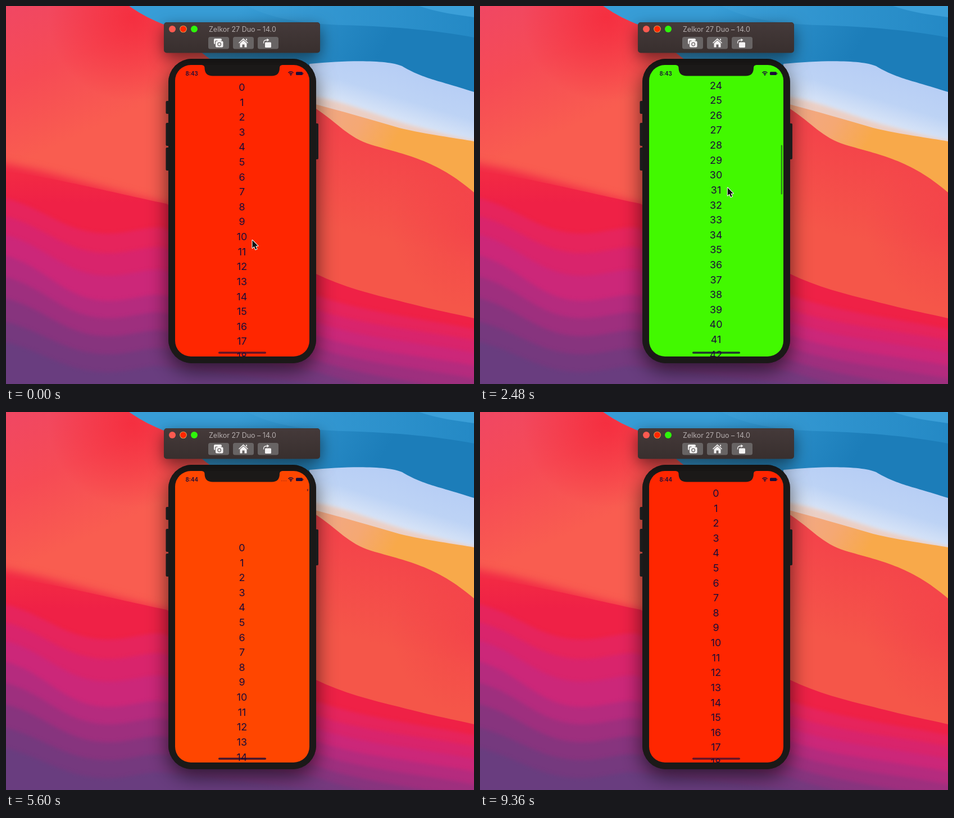
Write an HTML page with a canvas that moves like this. It is 833x673 px and loops after 9.44 s.

```html
<!DOCTYPE html>
<html lang="en">
<head>
<meta charset="utf-8">
<title>Scroll hue</title>
<style>
html, body { margin: 0; width: 100%; height: 100%; overflow: hidden; background: #000; }
canvas { display: block; width: 100vw; height: 100vh; }
</style>
</head>
<body>
<canvas id="stage" width="833" height="673"></canvas>
<script>
const W = 833, H = 673, LOOP = 9440, STEP = 80;
const ROW = 26.62, FIRST_Y = 144.5, MAX_SCROLL = 2191;
const ctx = document.getElementById('stage').getContext('2d');

// time, scroll offset, hue
const SCROLL = [
  [0, 0, 0], [960, 0, 0], [1680, 89, 12], [2040, 130, 20], [3040, 1378, 226],
  [3300, 1378, 226], [4080, 2191, 360], [4320, 2191, 360], [5280, 0, 0],
  [5600, -97, 14], [6000, 0, 0], [6400, 0, 0], [6880, 143, 14],
  [7280, 143, 14], [7920, 0, 0], [LOOP, 0, 0]
];
// time, x, y
const POINTER = [
  [0, 438, 417], [960, 438, 417], [1680, 442, 387], [3120, 439, 278],
  [4160, 416, 340], [4320, 416, 455], [4480, 417, 600]
];
const INDICATOR = [[960, 2960], [3300, 6000], [6400, 6960], [7280, 7920]];

function sample(keys, t) {
  let i = 1;
  while (i < keys.length - 1 && keys[i][0] < t) i++;
  const a = keys[i - 1], b = keys[i];
  const u = Math.min(1, Math.max(0, (t - a[0]) / (b[0] - a[0])));
  const s = u * u * (3 - 2 * u);
  return [a[1] + (b[1] - a[1]) * s, a[2] + (b[2] - a[2]) * s];
}

// Fully saturated hue as shown through the display's colour profile.
function hueColor(deg) {
  const channel = n => {
    const k = (n + deg / 60) % 6;
    return 1 - Math.max(0, Math.min(k, 4 - k, 1));
  };
  const lin = v => v <= 0.04045 ? v / 12.92 : ((v + 0.055) / 1.055) ** 2.4;
  const enc = v => v <= 0.0031308 ? v * 12.92 : 1.055 * v ** (1 / 2.4) - 0.055;
  const r = channel(5), g = channel(3), b = channel(1);
  const shown = enc(Math.min(1, 0.947 * lin(g) + 0.0194 * lin(r) + 0.033 * lin(b)));
  return `rgb(${[r, shown, b].map(v => Math.round(v * 255)).join()})`;
}

function box(c, x, y, w, h, r, fill) {
  c.beginPath();
  c.roundRect(x, y, w, h, r);
  c.fillStyle = fill;
  c.fill();
}

function dot(c, x, y, r, fill) {
  c.beginPath();
  c.arc(x, y, r, 0, Math.PI * 2);
  c.fillStyle = fill;
  c.fill();
}

function shape(c, d, fill) {
  c.fillStyle = fill;
  c.fill(new Path2D(d));
}

function gradient(c, x0, y0, x1, y1, ...colors) {
  const g = c.createLinearGradient(x0, y0, x1, y1);
  colors.forEach((color, i) => g.addColorStop(i / (colors.length - 1), color));
  return g;
}

function glow(c, x, y, r, rgb, alpha) {
  const g = c.createRadialGradient(x, y, 0, x, y, r);
  g.addColorStop(0, `rgba(${rgb},${alpha})`);
  g.addColorStop(1, `rgba(${rgb},0)`);
  c.fillStyle = g;
  c.fillRect(x - r, y - r, 2 * r, 2 * r);
}

function drawWallpaper(c) {
  // blue sky
  c.fillStyle = gradient(c, 420, 0, 640, 130, '#379dd7', '#1c7db9');
  c.fillRect(0, 0, W, H);
  shape(c, 'M210 0 H430 C470 22 530 32 600 34 C700 37 770 44 833 56 V0Z',
    gradient(c, 240, 0, 833, 0, '#45a9e0', '#3498d2', '#2489c5'));
  shape(c, 'M735 0 C770 12 800 15 833 20 V0Z', '#3b9fd8');

  // pale waves
  shape(c, 'M540 103 C610 96 680 96 705 107 C740 128 760 130 833 153 V260 H540Z',
    gradient(c, 700, 100, 665, 215, '#b6cdf5', '#bdd3f5', '#e6edf8'));
  c.filter = 'blur(3px)';
  shape(c, 'M540 160 C600 168 650 192 720 212 C765 224 800 233 840 241 V270 H540Z', '#ebcfc5');
  c.filter = 'none';
  shape(c, 'M540 172 C600 188 650 202 700 217 C750 229 800 235 833 241 V345 H540Z',
    gradient(c, 570, 180, 690, 245, '#f2a884', '#f5a873', '#f8a94a'));

  // coral hill
  c.save();
  c.beginPath();
  c.moveTo(0, 0);
  c.lineTo(219, 0);
  c.bezierCurveTo(245, 18, 262, 25, 283, 34);
  c.bezierCurveTo(340, 65, 352, 100, 400, 110);
  c.bezierCurveTo(480, 130, 530, 170, 552, 183);
  c.bezierCurveTo(590, 208, 610, 235, 650, 247);
  c.bezierCurveTo(710, 265, 765, 273, 833, 332);
  c.lineTo(W, H);
  c.lineTo(0, H);
  c.clip();
  c.fillStyle = gradient(c, 0, 0, 110, 240, '#f04763', '#f64b55', '#f95d50');
  c.fillRect(0, 0, 420, H);
  c.fillStyle = gradient(c, 640, 235, 600, 400, '#f4444a', '#f55649');
  c.fillRect(420, 0, 420, H);
  glow(c, 225, 20, 150, '245,40,58', 0.8);
  glow(c, 835, 390, 150, '243,62,74', 0.6);
  c.restore();

  // red slope and violet bands
  c.filter = 'blur(8px)';
  shape(c, 'M-20 278 C70 290 180 330 300 355 V420 H-20Z', '#f12945');
  c.filter = 'none';
  shape(c, 'M0 295 C70 302 190 332 285 352 L552 477 C600 500 650 513 700 525 C760 541 800 548 833 556 V673 H0Z',
    gradient(c, 0, 290, 0, 350, '#f32b43', '#ef2146'));
  const bands = [
    [340, 395, 515, 577, '#e6245c'], [372, 430, 540, 597, '#d9246c'],
    [405, 470, 563, 619, '#cc2779'], [442, 515, 586, 642, '#b52b7e'],
    [480, 546, 608, 665, '#9e2f7e'], [518, 578, 630, 690, '#87347e'],
    [560, 610, 650, 715, '#75397e'], [596, 642, 672, 740, '#693d7f']
  ];
  c.filter = 'blur(3px)';
  for (const [left, mid, start, end, color] of bands) {
    shape(c, `M-10 ${left} C70 ${left + 18} 100 ${mid + 8} 180 ${mid + 10}
      C220 ${mid + 11} 250 ${mid - 4} 280 ${mid} L552 ${start}
      C630 ${start + 28} 740 ${end - 20} 843 ${end} V783 H-10Z`, color);
  }
  c.filter = 'none';
}

function drawToolbar(c) {
  c.save();
  c.shadowColor = 'rgba(0,0,0,.55)';
  c.shadowBlur = 28;
  c.shadowOffsetY = 9;
  box(c, 281, 29, 278, 54.5, 5, '#3c3231');
  c.restore();
  box(c, 281.5, 29.5, 277, 53.5, 5, gradient(c, 0, 29, 0, 83, '#453a3a', '#382f2e'));
  dot(c, 296, 41, 6, '#fb5a50');
  dot(c, 315.5, 41, 6.3, '#dfa35c');
  dot(c, 315.5, 41, 5.4, '#ff2600');
  dot(c, 335, 41, 6, '#2ef50a');
  c.font = '12.5px Inter, sans-serif';
  c.fillStyle = '#b4adad';
  c.textAlign = 'left';
  c.fillText('Zelkor 27 Duo – 14.0', 361, 45.7);
  for (const x of [360, 404, 448]) box(c, x, 55, 37, 21.5, 3.5, '#686464');

  // camera
  const white = '#f5f3f3';
  box(c, 370, 58, 14, 10, 2, white);
  box(c, 372, 61.5, 15, 12.5, 2, '#686464');
  box(c, 373, 62.5, 13.5, 11, 2, white);
  box(c, 376.5, 60.8, 6, 3, 1, white);
  dot(c, 379.7, 68, 3.4, '#686464');
  dot(c, 379.7, 68, 2.2, white);
  // house
  shape(c, 'M422.5 57.5 L431 65.5 L430 66.6 L422.5 59.8 L415 66.6 L414 65.5Z', white);
  shape(c, 'M422.5 61 L428.5 66.4 V73.5 H424.5 V68.5 H420.5 V73.5 H416.5 V66.4Z M427 58.5 H429 V62 L427 60Z', white);
  // rotate
  box(c, 461, 64.5, 11, 9.5, 1.5, white);
  c.strokeStyle = white;
  c.lineWidth = 1.4;
  c.stroke(new Path2D('M458.5 66.5 C458 62 460.5 60.5 465 60.5'));
  shape(c, 'M464.5 57.7 L468.5 60.5 L464.5 63.3Z', white);
}

function drawPhone(c) {
  c.save();
  c.shadowColor = 'rgba(0,0,0,.62)';
  c.shadowBlur = 36;
  c.shadowOffsetY = 13;
  box(c, 289, 94, 263, 542, 42, '#1b1918');
  c.restore();
  for (const [x, y, h] of [[284.5, 169, 23], [284.5, 208, 41], [284.5, 252, 41], [549, 209, 64]])
    box(c, x, y, 7, h, 2, '#1b1b1c');
  box(c, 289, 94, 263, 542, 42, '#1b1918');
}

const backdrop = document.createElement('canvas');
backdrop.width = W;
backdrop.height = H;
const back = backdrop.getContext('2d');
drawWallpaper(back);
drawPhone(back);
drawToolbar(back);

function drawStatus(t, ink) {
  ctx.fillStyle = ink;
  ctx.textAlign = 'left';
  ctx.font = '600 9.8px Inter, sans-serif';
  ctx.fillText(t < 3760 ? '8:43' : '8:44', 319.5, 123.6);
  if ((t > 1000 && t < 2200) || (t > 5200 && t < 6200)) {
    ctx.globalAlpha = 0.4;
    for (let i = 0; i < 4; i++) dot(ctx, 490.5 + i * 2.7, 122.5, 0.7, ink);
    ctx.globalAlpha = 1;
  }
  ctx.strokeStyle = ink;
  ctx.lineWidth = 1.5;
  for (const r of [3.5, 6.2]) {
    ctx.beginPath();
    ctx.arc(507, 123.3, r, -Math.PI * 0.76, -Math.PI * 0.24);
    ctx.stroke();
  }
  dot(ctx, 507, 122.5, 1.3, ink);
  box(ctx, 516, 117.3, 12, 5.8, 1.6, ink);
  box(ctx, 528.5, 119, 1, 2.4, 0.5, ink);
}

function indicatorAlpha(t) {
  let a = 0;
  for (const [start, end] of INDICATOR)
    if (t >= start) a = Math.max(0, Math.min(1, 1 - (t - end) / 320));
  return a;
}

function drawScreen(t) {
  const [offset, hue] = sample(SCROLL, t);
  const ink = hue > 180 && hue < 300 ? '#0b1a30' : '#1b0d38';
  ctx.save();
  ctx.beginPath();
  ctx.roundRect(301, 105, 239, 519, 28);
  ctx.clip();
  ctx.fillStyle = hueColor(hue);
  ctx.fillRect(300, 104, 241, 521);

  ctx.font = '17.9px Inter, sans-serif';
  ctx.textAlign = 'center';
  ctx.fillStyle = ink;
  for (let i = 0; i < 100; i++) {
    const y = FIRST_Y + i * ROW - offset;
    if (y > 90 && y < 640) ctx.fillText(i, 420, y + 6.4);
  }

  ctx.globalAlpha = 0.5 * indicatorAlpha(t);
  const top = 137 + Math.max(0, offset) / MAX_SCROLL * 377;
  box(ctx, 535.8, top, 2.4, Math.max(4, 88 + Math.min(0, offset)), 1.2, ink);
  ctx.globalAlpha = hue > 6 && hue < 354 ? 0.82 : 0.68;
  box(ctx, 378, 615.6, 85, 3.4, 1.7, ink);
  ctx.globalAlpha = 1;

  drawStatus(t, ink);
  shape(ctx, 'M348 104 V105 Q353.5 105.5 353.5 110 Q353.5 124.5 368 124.5 H473 Q487 124.5 487 110 Q487 105.5 492 105 V104Z', '#1b1918');
  ctx.restore();
}

function drawPointer(t) {
  if (t >= 4480) return;
  if (t >= 4240) {
    const [x, y] = sample(POINTER, t - 140);
    dot(ctx, x, y, 13.2, '#aaa7b5');
  }
  const [x, y] = sample(POINTER, t);
  const arrow = new Path2D('M0 0 V14 L3.2 11 L5.6 16.6 L8 15.6 L5.7 10.2 H10Z');
  ctx.save();
  ctx.translate(x + 0.5, y);
  ctx.lineJoin = 'round';
  ctx.strokeStyle = '#fff';
  ctx.lineWidth = 2;
  ctx.stroke(arrow);
  ctx.fillStyle = '#111';
  ctx.fill(arrow);
  ctx.restore();
}

const begin = performance.now();
function frame() {
  const elapsed = (performance.now() - begin) % LOOP;
  const t = Math.floor(elapsed / STEP) * STEP;
  ctx.drawImage(backdrop, 0, 0);
  drawScreen(t);
  drawPointer(t);
  requestAnimationFrame(frame);
}
frame();
</script>
</body>
</html>
```
